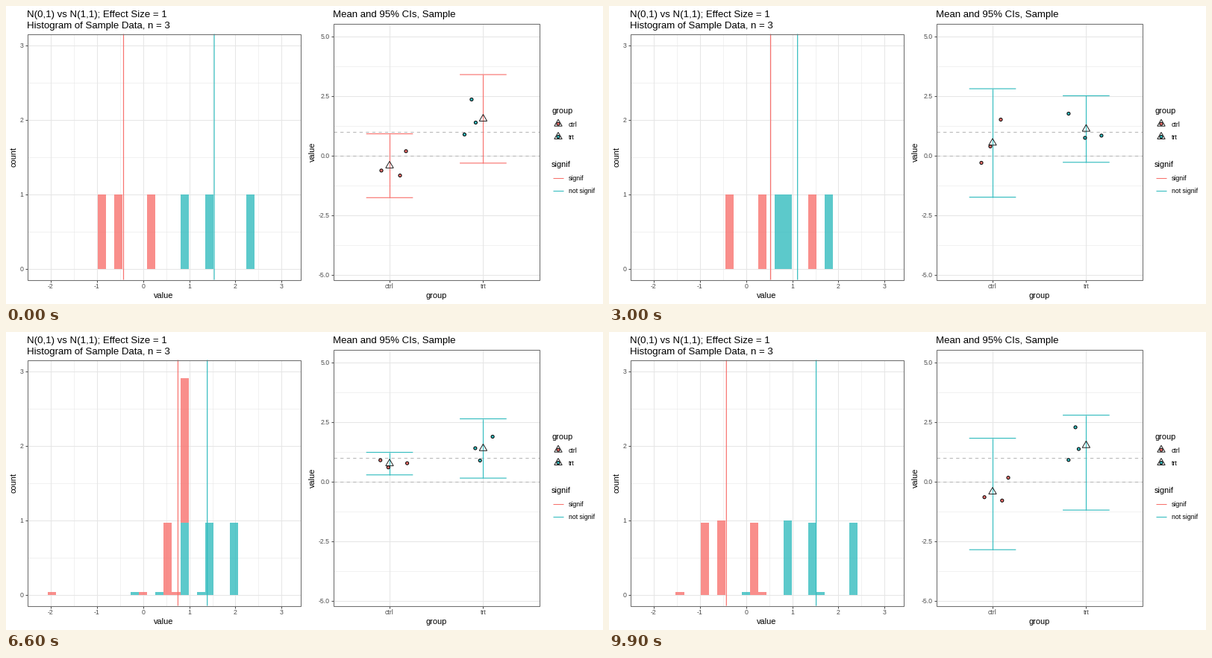
Recreate the animation shown at these times as a matplotlib script. Size 800 by 400 pixels, loop 10 s.

```python
import numpy as np
import matplotlib.pyplot as plt
from matplotlib.animation import FuncAnimation
from matplotlib.patches import Circle, Polygon, Rectangle

plt.rcParams["font.family"] = "Liberation Sans"

W, H, DPI = 800, 400, 100
PX = 72 / DPI                      # points per pixel
RED, TEAL = "#F8726E", "#33BCBF"
COLORS = (RED, TEAL)
INK, TICK, BORDER, GRID = "#1A1A1A", "#4D4D4D", "#707070", "#E6E6E6"
T_CRIT = 4.3027                    # two-sided 95 %, 2 degrees of freedom
STEPS, HOLD = 10, 5                # frames per sample, last resting frame

# Ten samples: three control values, then three treatment values.
VALUES = np.array([
    [-.625, -.832, .187, 2.353, 1.385, .885],
    [1.621, .314, -.863, .908, .579, -.392],
    [.55, .50, .72, 2.15, .90, .54],
    [1.51, .386, -.301, 1.76, .745, .839],
    [-1.0, -2.12, 1.0, 1.2, .3, 1.9],
    [-.067, -.041, .95, .28, 1.35, 1.79],
    [.905, .62, .86, 1.434, 1.905, .92],
    [.64, -.07, -1.89, .36, 1.25, -.18],
    [-.119, .62, -.034, .657, 2.48, 3.022],
    [-1.46, .42, -.51, -.02, .83, 1.58],
]).reshape(10, 2, 3)

# Sideways jitter of the same points, in pixels.
JITTER = np.array([
    [-11, 14, 22, -15.5, -10, -25],
    [-23, -6, -5.5, -10, 18, 4.5],
    [6, -19, 16, -17, 11, -3],
    [11, -3, -15, -23.5, -1.5, 20.5],
    [-8, 17, 3, 14, -20, 7],
    [-18.5, -15, 20.5, -5.5, 7.5, 24],
    [-13, -1, 24.5, -11.5, 13.5, -4.5],
    [9, -22, -4, 18, -12, 5],
    [-.5, 19, 24, -21, -6.5, 23.5],
    [-9, -24, -9, 20, -9.5, 20],
]).reshape(10, 2, 3)

BIN, FIRST, BINS = .17916, -12, 30
GROUP_X = (514, 639.4)
LEFT = (28.5, 37.5, 394.5, 367.5)
RIGHT = (438.5, 23.5, 714.5, 367.5)


def hist_x(v):
    return 183.7 + 61.87 * v


def hist_y(count):
    return 352.5 - 100 * count


def val_y(v):
    return 200.85 - 32.04 * v


def bin_counts(values):
    idx = np.floor(values / BIN + .5).astype(int) - FIRST
    return np.array([np.bincount(g, minlength=BINS) for g in idx], float)


COUNTS = np.array([bin_counts(v) for v in VALUES])
MEANS = VALUES.mean(axis=2)
HALF = T_CRIT * VALUES.std(axis=2, ddof=1) / np.sqrt(3)
CIS = np.stack([MEANS - HALF, MEANS + HALF], axis=2)
POOLED_SE = np.sqrt(VALUES.var(axis=2, ddof=1).sum(axis=1) / 3)
SIGNIF = np.abs(MEANS[:, 1] - MEANS[:, 0]) / POOLED_SE > 2.776

fig = plt.figure(figsize=(W / DPI, H / DPI), dpi=DPI, facecolor="white")
ax = fig.add_axes([0, 0, 1, 1])
ax.set_xlim(0, W)
ax.set_ylim(H, 0)
ax.axis("off")


def line(xs, ys, color, width=1.07, z=1, **kw):
    return ax.plot(xs, ys, color=color, lw=width * PX, zorder=z,
                   solid_capstyle="butt", **kw)[0]


def text(x, y, s, px, color="black", ha="left", **kw):
    ax.text(x, y, s, fontsize=px * PX, color=color, ha=ha, va="baseline", **kw)


def side_title(x, y, s):
    text(x, y, s, 11, ha="center", rotation=90, rotation_mode="anchor")


def triangle_points(x, y, r=6):
    return [(x, y - r), (x + .866 * r, y + r / 2), (x - .866 * r, y + r / 2)]


def triangle(x, y):
    return ax.add_patch(Polygon(triangle_points(x, y), closed=True, fill=False,
                                ec=INK, lw=.95 * PX, zorder=7))


def dot(x, y, color):
    return ax.add_patch(Circle((x, y), 2.05, fc=color, ec="black",
                               lw=PX, zorder=6))


def panel(box, xs, x_labels, ys, y_labels, minor_x, minor_y, label_gap):
    x0, y0, x1, y1 = box
    for x in minor_x:
        line([x, x], [y0, y1], GRID, .55)
    for y in minor_y:
        line([x0, x1], [y, y], GRID, .55)
    for x, s in zip(xs, x_labels):
        line([x, x], [y0, y1], GRID)
        line([x, x], [y1, y1 + 3], TICK)
        text(x, 379.3, s, 8.8, TICK, "center")
    for y, s in zip(ys, y_labels):
        line([x0, x1], [y, y], GRID)
        line([x0 - 3, x0], [y, y], TICK)
        text(x0 - label_gap, y + 3.2, s, 8.8, TICK, "right")
    ax.add_patch(Rectangle((x0, y0), x1 - x0, y1 - y0, fill=False,
                           ec=BORDER, lw=1.07 * PX, zorder=9))


# Histogram panel
ticks = np.arange(-2, 4)
counts = np.arange(4)
panel(LEFT, hist_x(ticks), [str(t) for t in ticks],
      hist_y(counts), [str(c) for c in counts],
      hist_x(ticks[:-1] + .5), hist_y(counts[:-1] + .5), 5)
text(28.5, 15, "N(0,1) vs N(1,1); Effect Size = 1", 13.2)
text(28.5, 30, "Histogram of Sample Data, n = 3", 13.2)
text(211.5, 391.5, "value", 11, ha="center")
side_title(14, 202.5, "count")

# Interval panel
levels = np.arange(-5, 5.1, 2.5)
panel(RIGHT, GROUP_X, ["ctrl", "trt"], val_y(levels),
      [f"{v:.1f}" for v in levels], [], val_y(levels[:-1] + 1.25), 4.5)
text(438.5, 15, "Mean and 95% CIs, Sample", 13.2)
text(576.5, 391.5, "group", 11, ha="center")
side_title(413.5, 196, "value")
for v in (0, 1):
    line([RIGHT[0], RIGHT[2]], [val_y(v)] * 2, "#B8B8B8", 1.07, 2,
         dashes=(4, 4), dash_capstyle="butt")

# Legends
text(731, 143.7, "group", 11)
text(731, 215.7, "signif", 11)
for i, (color, group, label) in enumerate(
        zip(COLORS, ("ctrl", "trt"), ("signif", "not signif"))):
    y = 158.2 + 17.3 * i
    dot(740, y, color)
    triangle(740, y)
    text(754, y + 3.4, group, 8.8)
    y = 230.8 + 17.3 * i
    line([733, 747], [y, y], color)
    text(754, y + 3.2, label, 8.8)

# Moving parts
edges = np.round(hist_x((np.arange(BINS + 1) + FIRST - .5) * BIN))
bars = [[ax.add_patch(Rectangle((a, 0), b - a, 0, fc=c, alpha=.8, lw=0,
                                antialiased=False, zorder=3))
         for a, b in zip(edges, edges[1:])] for c in COLORS]
mean_lines = [line([0, 0], [LEFT[1], LEFT[3]], c, 1.2, 4, snap=False)
              for c in COLORS]
stems = [line([x, x], [0, 0], TEAL, 1.15, 5) for x in GROUP_X]
caps = [[line([x - 31.3, x + 31.3], [0, 0], TEAL, 1.15, 5, snap=False)
         for _ in range(2)] for x in GROUP_X]
dots = [[dot(0, 0, c) for _ in range(3)] for c in COLORS]
means = [triangle(0, 0) for _ in COLORS]


def cubic_in_out(t):
    return 4 * t ** 3 if t < .5 else 1 - 4 * (1 - t) ** 3


def update(frame):
    now, step = divmod(frame, STEPS)
    nxt = (now + 1) % len(VALUES)
    k = cubic_in_out(max(0, step - HOLD) / (STEPS - HOLD))

    def mix(data):
        return data[now] + (data[nxt] - data[now]) * k

    # Intervals only glide between samples of the same significance.
    ci = mix(CIS) if SIGNIF[now] == SIGNIF[nxt] else CIS[now]
    ci_color = RED if SIGNIF[now] else TEAL
    height, value, shift, mean = map(mix, (COUNTS, VALUES, JITTER, MEANS))

    for g, x in enumerate(GROUP_X):
        base = height[1] if g == 0 else np.zeros(BINS)
        for bar, b, h in zip(bars[g], base, height[g]):
            bar.set_y(hist_y(b + h))
            bar.set_height(100 * h)
        mean_lines[g].set_xdata([hist_x(mean[g])] * 2)
        stems[g].set_ydata(val_y(ci[g]))
        stems[g].set_color(ci_color)
        for cap, v in zip(caps[g], ci[g]):
            cap.set_ydata([val_y(v)] * 2)
            cap.set_color(ci_color)
        for d, dx, v in zip(dots[g], shift[g], value[g]):
            d.center = (x + dx, val_y(v))
        means[g].set_xy(triangle_points(x, val_y(mean[g])))
    return []


anim = FuncAnimation(fig, update, frames=STEPS * len(VALUES), interval=100,
                     init_func=lambda: update(0), repeat=True, repeat_delay=0)
plt.show()
```
